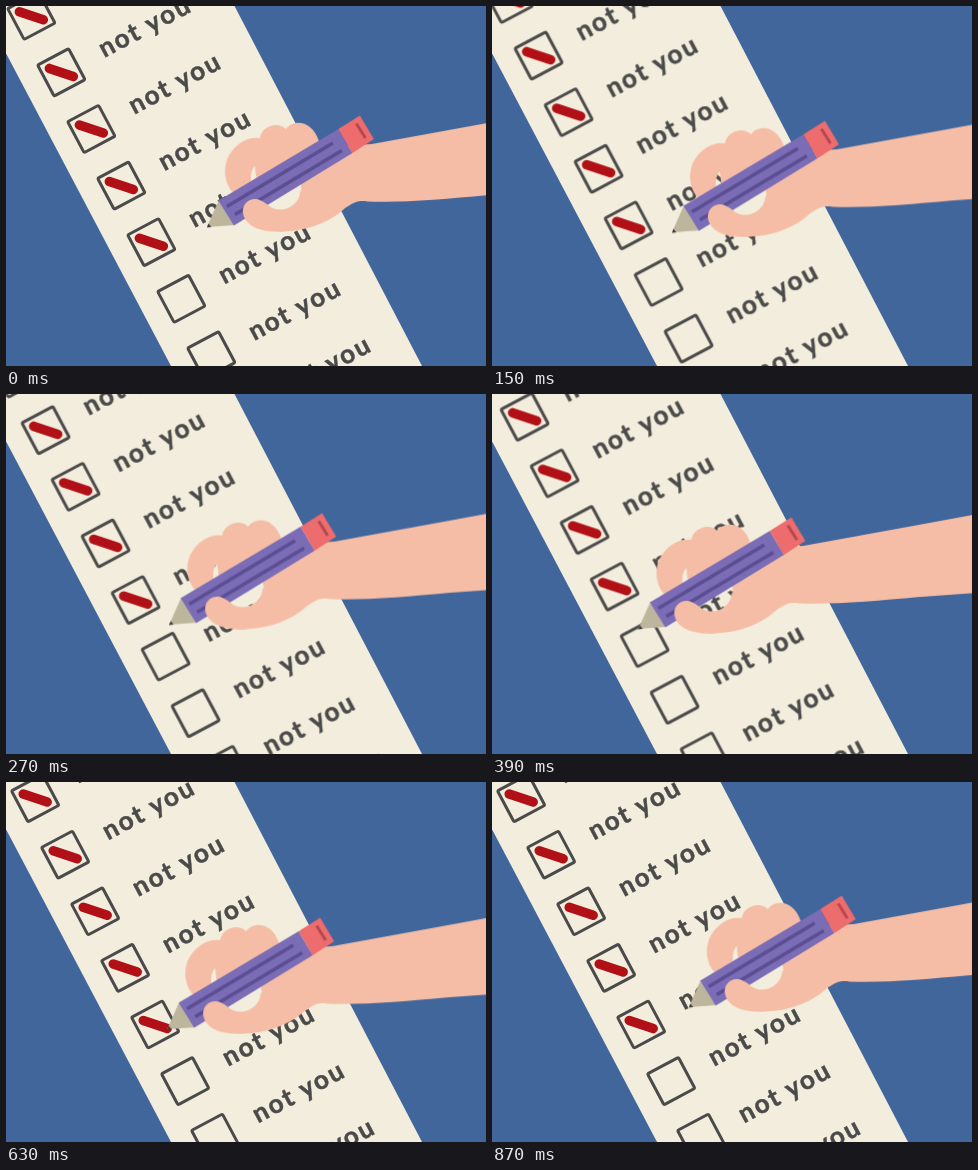
An HTML page for the animation above (0.9 s loop, 480 by 360 pixels).

```html
<!DOCTYPE html>
<html lang="en">
<head>
<meta charset="utf-8">
<title>Checklist</title>
<style>
  html, body { margin: 0; width: 100%; height: 100%; overflow: hidden; background: #41669c; }
  svg { display: block; width: 480px; height: 360px; }

  .box { fill: none; stroke: #4b4a4a; stroke-width: 3; stroke-linejoin: round; }
  .label {
    font: 700 26px Lato, sans-serif;
    letter-spacing: 2px;
    fill: #4b4a4a;
    stroke: #4b4a4a;
    stroke-width: .5;
    stroke-linejoin: round;
  }
  .mark { stroke: #b11116; stroke-width: 9.5; stroke-linecap: round; }
  .skin { fill: #f5bda5; }
  .groove { stroke: #5b4e92; stroke-width: 3.6; }

  .list, .hand, .new { animation: 900ms linear infinite; }
  .list { animation-name: scroll; }
  .hand { animation-name: move; }
  .new { stroke-dasharray: 25.3 80; animation-name: draw; }

  @keyframes scroll {
    0% { transform: translate(-3.8px, -6.2px); }
    50%, 100% { transform: translate(-30px, -56.6px); }
  }
  @keyframes move {
    0% { transform: translate(0, 0); }
    43.33% { transform: translate(-54.5px, 13.8px); }
    50% { transform: translate(-62.5px, 17px); }
    52% { transform: translate(-62px, 19.3px); }
    56.67% { transform: translate(-57.5px, 22px); }
    70% { transform: translate(-40px, 26.3px); }
    100% { transform: translate(0, 1.4px); }
  }
  @keyframes draw {
    0%, 49.99% { stroke-dashoffset: 25.3; visibility: hidden; }
    50% { stroke-dashoffset: 25.3; visibility: visible; }
    70%, 100% { stroke-dashoffset: 0; visibility: visible; }
  }
</style>
</head>
<body>
<svg viewBox="0 0 480 360">
  <rect width="480" height="360" fill="#41669c"/>
  <path d="M-25 0H228.500L416 360H165Z" fill="#f2eddc"/>

  <g class="list" id="list"></g>

  <g class="hand">
    <!-- fingers -->
    <path class="skin" d="M230 189C218 180 216 160 224 148C230 138 242 130 254 132
      C256 120 272 115 280 123C288 112 307 115 313 135L300 165L255 182
      C249 174 250 165 249 160C244 165 244 174 247 182Z"/>
    <!-- palm and arm -->
    <path class="skin" d="M292 170C298 184 297 196 286 204L270 225.500C300 226 322 217 338 203
      C348 196 352 194 362 195.500C395 197 440 193 480 189.300L560 183.500V102.500L480 117.300
      L366 138L330 140Z"/>

    <!-- pencil -->
    <path d="M213 194L201 221L229 219Z" fill="#bdb69d"/>
    <path d="M202.500 217.500L201 221.500L205.500 221Z" fill="#3c3a3a"/>
    <path d="M212.500 194.500L332.500 123L346.500 147L228 219.500Z" fill="#7b6cb6"/>
    <path class="groove" d="M221 200.500L327 137M229 208.500L336 144.500"/>
    <path d="M332.500 123L354 109.500L368 133L346.500 147Z" fill="#ed6c6d"/>
    <path d="M350.500 117.500L359.500 132" stroke="#b5474f" stroke-width="2.800"/>

    <!-- thumb -->
    <path class="skin" d="M237 205C237 196 246 190 255 194.500C262 197.500 264 203 273 203.500
      C284 204 294 196 294.500 185L335 170L338 203C322 217 298 225.500 270 225.500
      C249 225.500 237 216 237 205Z"/>
  </g>
</svg>
<script>
  const row = (k) => {
    const mark = k > 1 ? '' :
      `<path class="mark${k === 1 ? ' new' : ''}" d="M-12 -4L12 4"/>`;
    return `<g transform="translate(${149.2 + 30 * k} ${242.5 + 56.6 * k})">
      <g transform="rotate(-28)">
        <rect class="box" x="-17.5" y="-17.5" width="35" height="35" rx="1.5"/>
        <text class="label" x="44.5" y="7.5">not you</text>
      </g>${mark}</g>`;
  };

  let rows = '';
  for (let k = -5; k <= 5; k++) rows += row(k);
  document.getElementById('list').innerHTML = rows;
</script>
</body>
</html>
```
